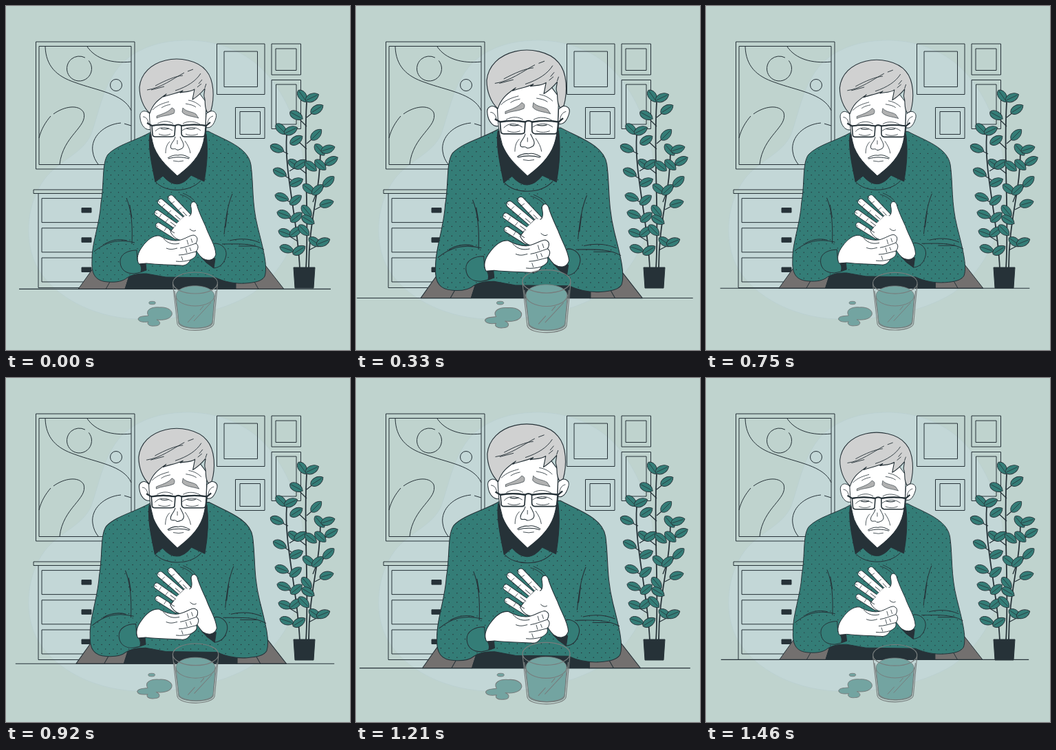
These frames come from a looping animation (500x500 px, 1.5 s). An HTML page with a canvas:

```html
<!DOCTYPE html>
<html lang="en">
<head>
<meta charset="utf-8">
<title>Man at a table</title>
<style>
html, body { margin: 0; width: 100%; height: 100%; overflow: hidden; background: #bfd3ce; }
canvas { display: block; width: 500px; height: 500px; }
</style>
</head>
<body>
<canvas id="stage"></canvas>
<script>
const canvas = document.getElementById('stage');
const ctx = canvas.getContext('2d');
const ratio = window.devicePixelRatio || 1;
canvas.width = canvas.height = 500 * ratio;

const INK = '#263238', TEAL = '#347d77', GREY = '#73706f', HAIR = '#d0d1d1', BROW = '#b0b1b1', WHITE = '#fff';
const LOOP = 1500, FPS = 24;

// Pulse: [step, scale]
const PULSE = [[0, 1.0125], [8, 1.0917], [9, 1.1], [14, 1.046], [18.5, 1], [22, 1.0358],
  [26, 1.0917], [27, 1.1], [32, 1.0358], [35, 1], [36, 1.0125]];

function pulseAt(step) {
  const i = PULSE.findIndex(([s]) => s > step);
  const [s0, v0] = PULSE[i - 1], [s1, v1] = PULSE[i];
  return v0 + (v1 - v0) * (step - s0) / (s1 - s0);
}

function draw(path, fill, stroke = INK, width = 1) {
  const p = typeof path === 'string' ? new Path2D(path) : path;
  if (fill) { ctx.fillStyle = fill; ctx.fill(p); }
  if (stroke) { ctx.strokeStyle = stroke; ctx.lineWidth = width; ctx.stroke(p); }
}
const line = (path, width = 1, color = INK) => draw(path, null, color, width);

function ellipse(x, y, rx, ry = rx, turn = 0, from = 0, to = 2 * Math.PI) {
  const p = new Path2D();
  p.ellipse(x, y, rx, ry, turn, from, to);
  return p;
}
function box(x0, y0, x1, y1, fill) {
  const p = new Path2D();
  p.rect(x0, y0, x1 - x0, y1 - y0);
  draw(p, fill);
}
function scaledAbout(x, y, k, paint) {
  ctx.save();
  ctx.translate(x, y);
  ctx.scale(k, k);
  ctx.translate(-x, -y);
  paint();
  ctx.restore();
}

function room() {
  draw('M258 50C310 48 360 70 388 110C418 150 434 205 434 255C434 325 408 382 358 418C310 447 245 457 190 455C125 453 65 420 43 375C25 335 32 285 55 253C75 225 112 215 124 186C136 152 142 112 168 84C192 60 225 51 258 50Z',
    '#c3d7d7', '#b9cfd0', .7);

  box(43.5, 52, 187, 237);
  box(48, 58.5, 182, 230.5);
  line('M57 59C58 87 73 102 100 111C132 123 171 127 182 152M118 59C130 77 154 84 182 81');
  line(ellipse(106.5, 91, 18, 18, 0, -.7, 5.2));
  line(ellipse(160, 115, 8.5));
  line('M69 157C84 146 106 142 113 155C119 176 83 188 78 230M48 192C51 179 58 168 65 160');
  line('M167 170C143 172 123 190 126 211C127 219 130 225 134 230M172 171L182 174');

  box(306.5, 55, 376, 128.5);
  box(317, 66, 365.5, 117.5);
  box(386, 55, 428.5, 100);
  box(392, 62, 422, 93.5);
  box(386, 107.5, 428.5, 178.5);
  box(392.5, 114, 422, 172);
  box(333.5, 147.5, 376, 192.5);
  box(340, 153.5, 369.5, 186.5);

  box(47, 272.5, 200, 409.5);
  box(40, 267, 200, 272.5, '#bfd3ce');
  for (const y of [279.6, 322.8, 366]) {
    box(52, y, 200, y + 35);
    box(110, y + 14, 124, y + 20.5, INK);
  }
}

// Leaves: x, y, angle in degrees
const LEAVES = [
  [431, 131, 55], [445, 133, -25], [422, 159, 28], [452, 150, -32], [400, 179, 45],
  [414, 181, -25], [394, 207, 22], [422, 195, -32], [451, 187, -45], [456, 209, 50],
  [468, 208, -18], [419, 230, 35], [428, 230, -32], [443, 233, 38], [398, 242, 25],
  [473, 225, -28], [457, 231, 42], [422, 256, -25], [440, 266, 38], [453, 267, -42],
  [469, 255, -42], [401, 278, 20], [421, 282, -38], [466, 287, -16], [404, 303, 20],
  [422, 307, -38], [437, 298, 50], [439, 311, 30], [406, 330, 20], [421, 328, -38],
  [433, 326, 45], [408, 353, 18], [426, 355, -32], [449, 343, 35], [461, 343, -22]
];
function plant() {
  line('M436 382C441 300 432 220 437 140M427 382C424 310 404 240 408 187M440 382C440 310 457 270 457 211', 1.8);
  line('M437 175L422 160M437 162L452 150M410 215L394 207M412 240L428 230M415 253L398 242M418 288L401 278M421 315L404 303M424 342L406 331M426 363L408 353M456 238L474 225M453 270L471 255M449 296L466 287M446 285L453 267M437 200L451 188M440 355L461 344M437 244L419 230M437 208L423 195', 1.3);
  for (const [x, y, degrees] of LEAVES) {
    ctx.save();
    ctx.translate(x, y);
    ctx.rotate(degrees * Math.PI / 180);
    draw('M-10.5 0C-8 -7.5 5 -8 10.5 0C5 8 -8 7.5 -10.5 0Z', TEAL, INK, .9);
    line('M-9 0H8', .7);
    ctx.restore();
  }
  draw('M418 380H449L447 410H420Z', INK);
}

const SWEATER = new Path2D('M211 183C188 196 161 202 148 216C139 229 143 258 138 286C136 319 124 346 125 371C124 391 131 400 148 401C161 402 170 400 176 395C184 390 192 389 204 389L232 394L305 395C318 401 333 404 348 403C362 402 372 400 376 393C381 378 373 350 366 322C357 286 360 260 356 231C352 205 318 195 294 182Z');

function body() {
  draw('M105 411.5L126 382L180 390L173 411.5Z', GREY);
  draw('M404 411.5L377 377L322 396L333 411.5Z', GREY);
  line('M151 401L145 411.5M361 401L367 411.5');
  draw('M180 389H315L334 402V411.5H173Z', INK);
  draw(SWEATER, TEAL);

  ctx.save();
  ctx.clip(SWEATER);
  ctx.fillStyle = INK;
  ctx.beginPath();
  for (let row = 0; row < 36; row++) {
    for (let x = 125 + row % 2 * 5.5; x < 382; x += 11) {
      const y = 189 + row * 6.3;
      ctx.moveTo(x, y);
      ctx.arc(x, y, .7, 0, 7);
    }
  }
  ctx.fill();
  ctx.restore();

  line('M175 279C183 298 184 322 183 346M180 290L183 308M329 273C321 292 319 314 317 332M322 298L319 322');
  line('M128 357C145 343 163 338 187 344M143 346C157 338 168 339 176 341M375 354C357 344 337 346 314 346M369 344C352 337 338 338 325 341M363 349L338 349');
  line('M218 256C231 271 266 272 283 254');
  line('M253 274C261 276 267 280 271 285M257 272C264 275 269 278 273 282', .8);
}

function head() {
  draw('M209 186C206 207 213 235 217 256L228 247Q249 271 269 246L288 255C292 232 294 210 291 186Z', INK);
  draw('M209 157C202 149 193 153 195 163C196 173 203 182 211 179ZM291 157C298 149 308 153 305 163C302 173 297 179 290 176Z', WHITE);
  line('M199 161C204 161 207 166 207 172M301 160C296 161 293 166 293 171', .8);
  draw('M208 145C209 170 209 185 215 205C223 225 239 237 249 247C259 239 278 225 285 204C291 187 290 165 291 140L270 112H220Z', WHITE);
  draw('M209 156C199 147 194 132 194 118C196 98 211 84 232 79C252 74 279 79 291 94C303 108 303 134 298 152L293 155C287 147 291 138 288 132C287 128 289 124 289 120C284 126 276 133 271 136L274 121C266 126 259 124 253 126L257 123C246 128 236 129 229 132L233 128C222 136 214 141 209 156Z', HAIR, INK, 1.1);
  line('M205 122C226 119 242 106 259 97M264 95L272 92M217 116C232 108 246 102 257 101M211 122L230 117M246 123C264 117 276 109 283 98M280 113L285 107M278 118L284 113M289 119L291 113', .9);

  line('M213 151C221 143 230 141 237 139M226 148C232 144 236 144 239 143M261 142C267 143 272 144 276 147M265 137C273 138 279 142 283 146', .8);
  draw('M219 160C226 157 237 154 241 148C245 149 246 152 244 156C236 160 226 159 219 163Z', BROW, INK, .6);
  draw('M257 148C262 154 270 153 276 157L280 163C271 160 260 160 256 154Z', BROW, INK, .6);

  line('M217 182C223 175 233 175 242 181M256 181C264 175 276 175 283 181M220 171C229 166 237 167 243 171M257 171C265 166 276 168 282 172M222 186C229 189 235 188 239 186M261 186C267 189 275 188 279 186', .8);
  line('M225 178Q231 180 237 178M262 178Q269 180 275 178', 1.2);
  line('M212 174C222 172 236 172 246 174L245 188Q244 190 240 190H217Q213 190 213 186ZM255 174C267 172 281 172 291 174L290 186Q289 190 285 190H259Q255 189 255 185Z', 1.6);
  line('M205 170L212 174Q229 171 246 174Q250 171 255 174Q274 171 291 174L297 169', 2.2);

  line('M246 190C245 197 237 201 240 207C243 209 246 206 248 209C251 210 253 208 256 207C261 202 256 197 253 190');
  line('M238 197C233 202 232 208 232 214M260 196C264 202 267 207 268 214', .8);
  line('M235 221C240 218 245 216 250 217C256 215 262 218 267 221M236 222C245 219 257 219 266 222', 1);
  line('M243 225Q251 227 258 225M249 195V201', .8);
}

function finger(x0, y0, x1, y1, width) {
  ctx.lineCap = 'round';
  line(`M${x0} ${y0}L${x1} ${y1}`, width + 1.8);
  line(`M${x0} ${y0}L${x1} ${y1}`, width, WHITE);
  ctx.lineCap = 'butt';
}
function hands() {
  draw('M190 355C178 355 165 360 166 373C167 384 175 389 186 389C192 388 197 387 203 384L191 370Z', TEAL);
  draw('M303 345C314 345 321 353 320 362C318 373 312 380 302 381L284 366Z', TEAL);
  draw('M191 370L203 374L204 384L196 386C198 380 195 375 191 370ZM281 361L304 367L302 381L291 373Z', INK);

  finger(240, 279.5, 268, 309, 8);
  finger(225, 285, 258, 313, 8);
  finger(220, 301, 250, 322, 7.5);
  finger(221.5, 319, 247, 335, 7);
  draw('M261 304C267 308 271 304 269 293C267 286 273 281 277 288C280 299 285 309 290 320C296 337 304 347 305 361C302 371 292 371 285 366C275 357 272 345 267 338C257 345 244 339 239 328C246 319 253 311 261 304Z', WHITE);
  draw('M246 318L264 301L269 313L258 337L241 331Z', WHITE, null);
  line('M253 310L246 304M247 320L239 314M245 330L237 325M263 305L257 299M267 324Q272 329 276 326', .9);
  line('M239 288L245 284M249 298L255 293M226 293L231 288M235 302L240 297M223 307L226 302M232 314L236 309M230 327L233 322', .7);
  line('M235 277L238 281M221 283L224 286M216 300L220 302M218 319L221 321', .7);

  draw('M193 375C189 367 192 358 198 350C205 340 214 333 223 334C230 338 239 341 247 341C258 341 266 333 273 333C279 335 279 340 276 345C281 348 279 354 276 357C278 363 274 366 268 369C265 375 260 378 254 377C239 376 220 376 204 374Z', WHITE);
  line('M276 345C267 348 260 351 253 352M276 357C267 359 259 362 251 362M268 369C261 371 254 372 247 371M229 338C236 346 244 347 252 345M233 352C240 355 244 353 249 352', .9);
  line('M263 340L265 347M261 352L263 359M255 364L257 370M269 338L271 344M267 351L269 356', .8);
}

function man() {
  body();
  head();
  hands();
  line('M19 411.4H472', 1.1);
}

function drink() {
  const rim = '#777d7d', water = '#73a4a1';
  draw('M192 455C193 450 203 451 207 450C202 442 211 437 223 438C235 437 243 443 241 449C238 456 227 457 219 456C226 459 225 465 216 465C208 466 204 462 207 459C199 460 193 459 192 455Z', water, rim);
  draw(ellipse(212.5, 431.5, 4.8, 2.2), water, rim, .9);
  draw('M247 421C248 402 301 402 303 421L300 462C296 471 256 471 251 462Z', water, rim, .8);
  line(ellipse(275, 421, 28, 15, 0, 0, Math.PI), 1, rim);
  line(ellipse(275, 402.5, 32.5, 15.5), 1.2, rim);
  line('M242.5 404L249 462C252 475 299 474 302 462L307.5 404M245 414L251 460C257 471 295 471 300 460L305 414', 1.1, rim);
  line('M264 460L274 449M273 458L298 431M282 442L287 436', 1, rim);
}

function render(ms) {
  const step = Math.floor((ms % LOOP) * FPS / 1000 + .1) % 36;
  const k = pulseAt(step) / PULSE[0][1];
  ctx.setTransform(ratio, 0, 0, ratio, 0, 0);
  ctx.lineJoin = 'round';
  ctx.fillStyle = '#bfd3ce';
  ctx.fillRect(0, 0, 500, 500);
  room();
  plant();
  scaledAbout(245.5, 244, k, man);
  scaledAbout(250, 430, k, drink);
}

let start;
function tick(now) {
  start ??= now;
  render(now - start);
  requestAnimationFrame(tick);
}
render(0);
requestAnimationFrame(tick);
</script>
</body>
</html>
```
